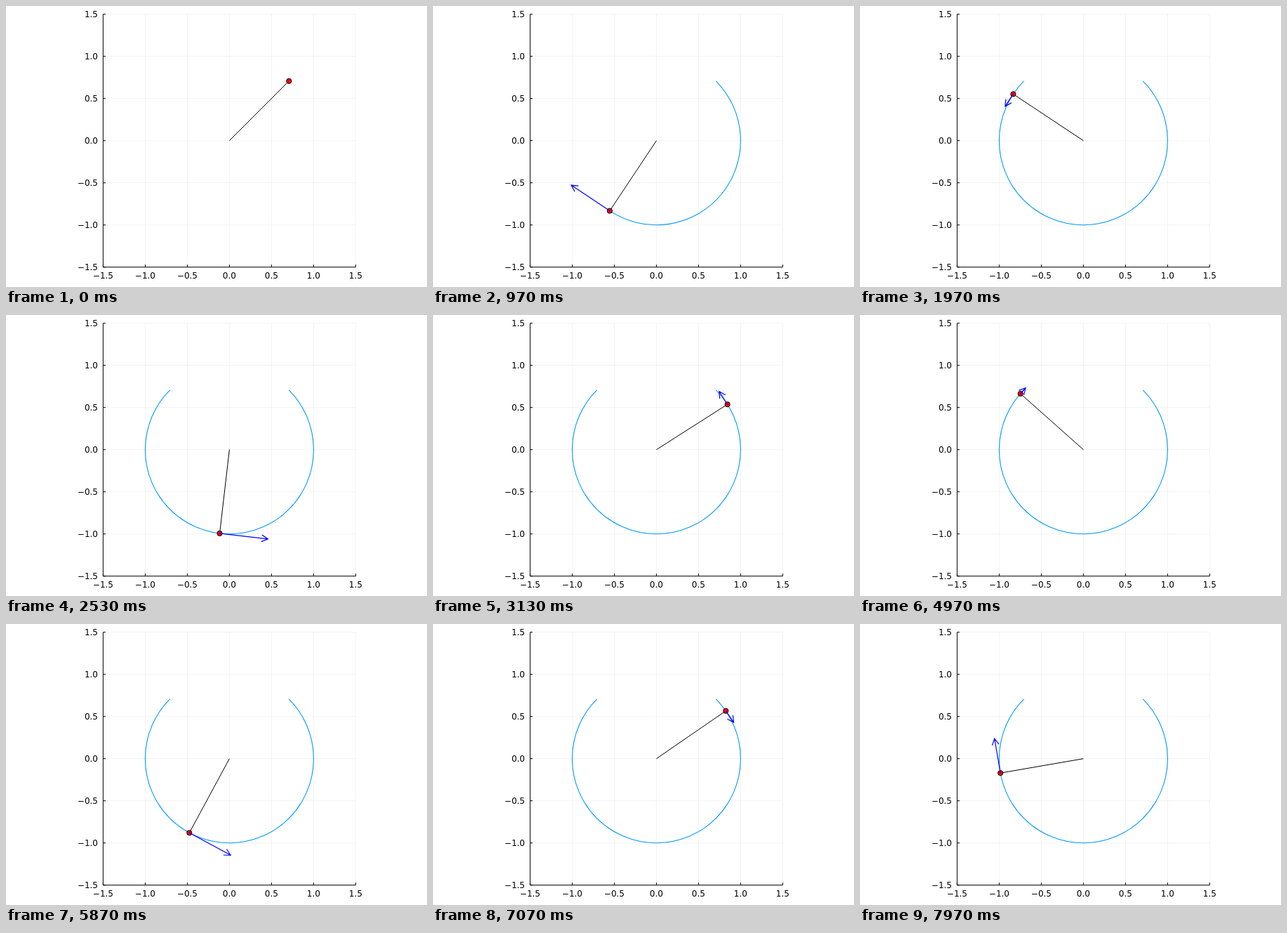
These frames come from a looping animation (600 by 400 pixels, 8000 ms). An HTML page:

```html
<!DOCTYPE html>
<html lang="en">
<head>
<meta charset="utf-8">
<title>Pendulum</title>
<style>
  html, body { margin: 0; width: 100%; height: 100%; overflow: hidden; background: #fff; }
  svg { display: block; width: 600px; height: 400px; }
  path, line { fill: none; stroke: #000; }
  text { font: 12px "DejaVu Sans", sans-serif; }
  .grid { stroke-opacity: .1; stroke-width: .5; }
  #trail { stroke: #009afa; stroke-width: 1.1; }
  #arrow { stroke: #00f; stroke-width: 1.2; }
  #bob { fill: #f00; stroke: #000; }
</style>
</head>
<body>
<svg viewBox="0 0 600 400">
  <g id="axes"></g>
  <path id="trail"/>
  <line id="rod"/>
  <circle id="bob" r="3.6"/>
  <path id="arrow"/>
</svg>
<script>
const UNIT = 120, CX = 318.4, CY = 191.7;
const GRAVITY = 9.8, START = 3 * Math.PI / 4;
const STEP = 0.03, SUBSTEPS = 30, FRAMES = 240, LOOP = 8000;
const ARROW_SCALE = 0.1, HEAD_LENGTH = 9.1, HEAD_WIDTH = 4.8;

const px = x => CX + UNIT * x;
const py = y => CY - UNIT * y;
const byId = id => document.getElementById(id);

function add(tag, attrs, label = '') {
  const node = document.createElementNS('http://www.w3.org/2000/svg', tag);
  setAttrs(node, attrs);
  node.textContent = label;
  byId('axes').append(node);
}

function setAttrs(node, attrs) {
  for (const name in attrs) node.setAttribute(name, attrs[name]);
}

function drawAxes() {
  const left = px(-1.5), right = px(1.5), top = py(1.5), bottom = py(-1.5);
  for (let v = -1.5; v <= 1.5; v += 0.5) {
    const x = px(v), y = py(v);
    const label = v.toFixed(1).replace('-', '\u2212');
    add('path', { class: 'grid', d: `M${x} ${top}V${bottom}M${left} ${y}H${right}` });
    add('path', { d: `M${x} ${bottom}v-3.6M${left} ${y}h3.6` });
    add('text', { x, y: 387.5, 'text-anchor': 'middle' }, label);
    add('text', { x: 131, y: y + 4.4, 'text-anchor': 'end' }, label);
  }
  add('path', { d: `M${left} ${top}V${bottom}H${right}` });
}

// Velocity Verlet; angles are measured from straight down.
function simulate() {
  const states = [], h = STEP / SUBSTEPS;
  let angle = START, speed = 0, lowest = START;
  for (let i = 0; i < FRAMES; i++) {
    lowest = Math.min(lowest, angle);
    states.push({ angle, speed, lowest });
    for (let j = 0; j < SUBSTEPS; j++) {
      speed -= GRAVITY * Math.sin(angle) * h / 2;
      angle += speed * h;
      speed -= GRAVITY * Math.sin(angle) * h / 2;
    }
  }
  return states;
}

const onCircle = a => [px(Math.sin(a)), py(-Math.cos(a))];

function trailPath(lowest) {
  if (lowest === START) return '';
  const large = START - lowest > Math.PI ? 1 : 0;
  return `M${onCircle(START)}A${UNIT} ${UNIT} 0 ${large} 1 ${onCircle(lowest)}`;
}

function arrowPath(angle, speed) {
  if (!speed) return '';
  const [x, y] = onCircle(angle), sign = Math.sign(speed);
  const dx = sign * Math.cos(angle), dy = -sign * Math.sin(angle);
  const length = Math.abs(speed) * ARROW_SCALE * UNIT;
  const tip = [x + dx * length, y + dy * length];
  const barb = w => [tip[0] - HEAD_LENGTH * dx - w * dy, tip[1] - HEAD_LENGTH * dy + w * dx];
  return `M${x} ${y}L${tip}M${barb(HEAD_WIDTH)}L${tip}L${barb(-HEAD_WIDTH)}`;
}

const states = simulate();

function render(now) {
  // Frame starts fall on whole hundredths of a second.
  const ticks = Math.floor(now % LOOP / 10);
  const { angle, speed, lowest } = states[Math.min(FRAMES - 1, Math.floor(ticks * 0.3 + 0.15))];
  const [x, y] = onCircle(angle);
  setAttrs(byId('rod'), { x1: CX, y1: CY, x2: x, y2: y });
  setAttrs(byId('bob'), { cx: x, cy: y });
  setAttrs(byId('trail'), { d: trailPath(lowest) });
  setAttrs(byId('arrow'), { d: arrowPath(angle, speed) });
}

function loop() {
  render(performance.now());
  requestAnimationFrame(loop);
}

drawAxes();
loop();
</script>
</body>
</html>
```
